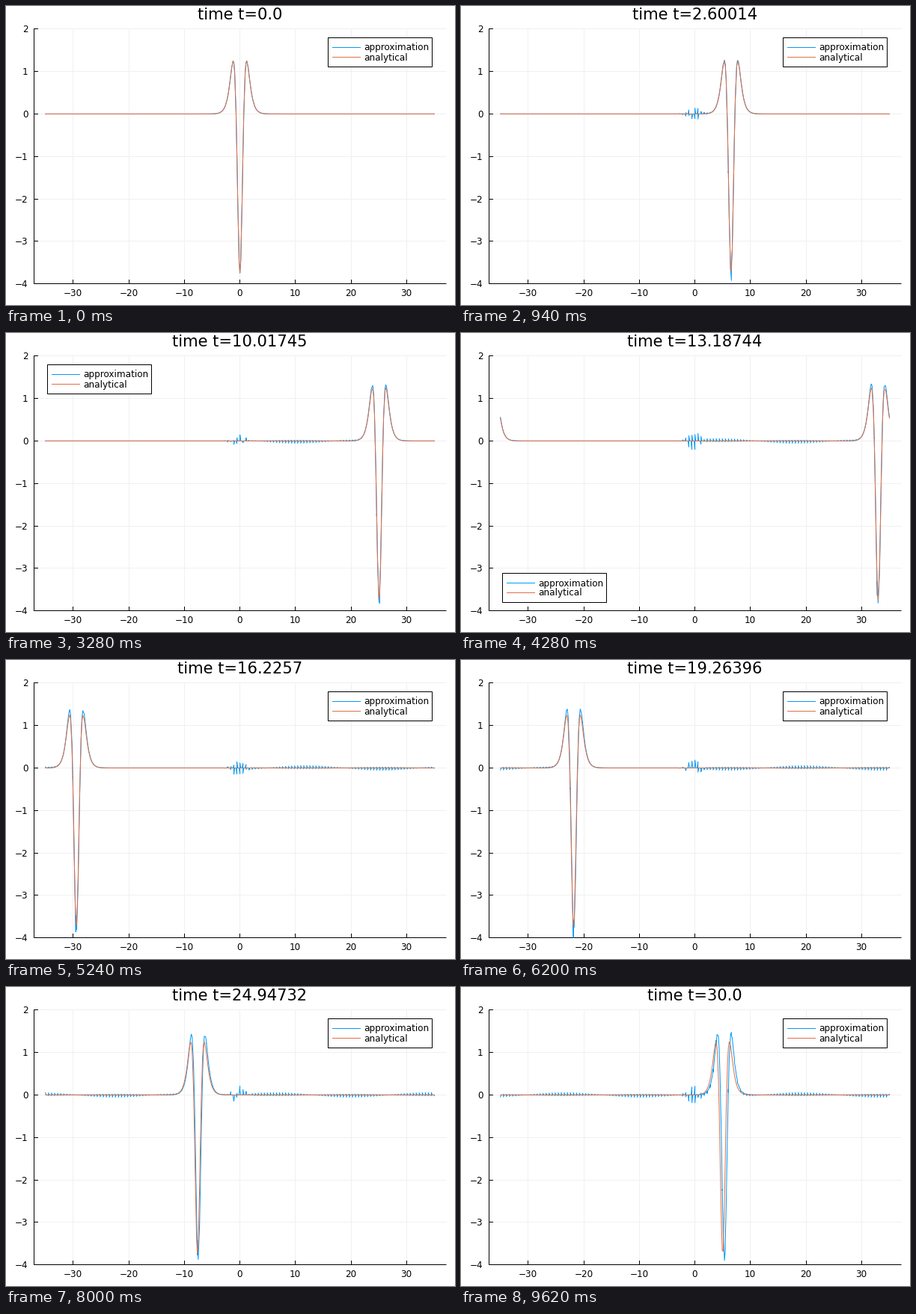
Recreate the animation shown at these times as a matplotlib script. Size 600 px wide and 400 px high, loop 9640 ms.

```python
import numpy as np
import matplotlib as mpl
import matplotlib.pyplot as plt
from matplotlib.animation import FuncAnimation
from matplotlib.patches import Rectangle

W, H, DPI = 600, 400, 100
FRAMES, STEP = 482, 20
BLUE, ORANGE = "#009afa", "#e36f47"
PT = 72 / DPI  # points per pixel

mpl.rcParams["font.family"] = "DejaVu Sans"
mpl.rcParams["path.simplify"] = False

# Periodic domain split into elements of four Lobatto nodes
HALF, CELLS, SPEED = 35.0, 128, 2.5
CELL = 2 * HALF / CELLS
edges = -HALF + CELL * np.arange(CELLS)
lobatto = np.array([0, (1 - 5 ** -0.5) / 2, (1 + 5 ** -0.5) / 2, 1])
nodes = edges[:, None] + CELL * lobatto

# Times reached by the adaptive stepper after its start-up
KEY = [47, 113, 214, 310, 400, 480, 481]
KEY_T = [2.60014, 6.78406, 13.18744, 19.26396, 24.94732, 29.9966, 30.0]

# Ripples that stay near x = 0, each cell edge with its own rhythm
rng = np.random.default_rng(4)
rate = rng.uniform(1.5, 3, (2, CELLS))
phase = rng.uniform(0, 2 * np.pi, (2, CELLS))
reach = 0.22 * np.exp(-((edges + 0.3) / 1.3) ** 2)


def px(x):
    return 312.6 + 7.426 * np.asarray(x)


def py(y):
    return 144.4 - 56.83 * np.asarray(y)


def wrap(x):
    return (x + HALF) % (2 * HALF) - HALF


def sim_time(n):
    if n <= KEY[0]:
        ramp = lambda k: k - 6 * (1 - np.exp(-k / 6))
        return KEY_T[0] * ramp(n) / ramp(KEY[0])
    return float(np.interp(n, KEY, KEY_T))


def profile(xi):
    return 3.75 * (np.cosh(3 * np.sqrt(0.4) * xi) - 2) / np.cosh(3 * xi / np.sqrt(10)) ** 4


def analytical(t):
    return profile(wrap(nodes - SPEED * t))


def approximation(t):
    tau, start = t / 30, min(t, 1)
    center = SPEED * t + 0.3 * tau ** 5
    u = profile(wrap(nodes - center))
    u = u * np.where(u > 0, 1 + 0.14 * tau * u, 1 + 0.04 * tau)

    # Oscillating jumps left behind by the wave
    d = center - edges % (2 * HALF)
    fade = np.clip((d - 2) / 5, 0, 1)
    trail = -0.055 * fade * np.cos(2 * np.pi * (d - 15) / 27.5)
    right, left = start * reach * np.sin(rate * t + phase)

    # Jump across the trough
    dip = 0.22 * start * np.exp(-(wrap(edges - center) / 0.3) ** 2)
    u[:, 0] += trail + right + dip
    u[:, 3] += np.roll(left - 0.35 * trail - dip, -1)
    return u


def legend_corner(series):
    """Emptiest corner; ties go to the first in the list."""
    x = np.concatenate([nodes.ravel()] * len(series))
    y = np.concatenate([s.ravel() for s in series])
    east, west = x >= 18.55, x <= -18.55
    top, low = y >= 0.5, y <= -2.5
    corners = [(430.5, 42.5, east & top), (55.5, 42.5, west & top),
               (430.5, 321.5, east & low), (55.5, 321.5, west & low)]
    best = min(corners, key=lambda c: c[2].sum())
    return best[:2]


fig = plt.figure(figsize=(W / DPI, H / DPI), dpi=DPI, facecolor="white")
ax = fig.add_axes([0, 0, 1, 1])
ax.set(xlim=(0, W), ylim=(H, 0))
ax.axis("off")


def stroke(x, y, color="black", z=2):
    return ax.plot(x, y, color=color, lw=PT, zorder=z, snap=False)[0]


def label(x, y, s, size=12, ha="center", z=2):
    return ax.text(x, y, s, fontsize=size * PT, ha=ha, va="baseline", zorder=z)


LEFT, RIGHT, TOP, BOTTOM = 37.5, 588, 30.5, 371.5
for v in range(-30, 31, 10):
    x = np.floor(px(v)) + 0.5
    stroke([x, x], [TOP, BOTTOM], "#f0f0f0", 1)
    stroke([x, x], [BOTTOM, BOTTOM - 5])
    label(x - 0.4, 387.5, str(v).replace("-", "\u2212"))
for v in range(-4, 3):
    y = np.floor(py(v)) + 0.5
    stroke([LEFT, RIGHT], [y, y], "#f0f0f0", 1)
    stroke([LEFT, LEFT + 5], [y, y])
    label(29.3, y + 4.3, str(v).replace("-", "\u2212"), ha="right")
stroke([LEFT, LEFT], [TOP, BOTTOM])
stroke([LEFT, RIGHT], [BOTTOM, BOTTOM])

title = label(312.4, 18, "", 21)
window = Rectangle((LEFT, TOP), RIGHT - LEFT, BOTTOM - TOP, transform=ax.transData)
curves = [stroke([], [], c, 3) for c in (BLUE, ORANGE)]
for c in curves:
    c.set_clip_path(window)
    c.set_solid_joinstyle("round")

box = ax.add_patch(Rectangle((0, 0), 139, 39, fc="white", ec="black", lw=PT,
                             zorder=4, snap=False))
keys = [stroke([], [], c, 5) for c in (BLUE, ORANGE)]
names = [label(0, 0, s, ha="left", z=5) for s in ("approximation", "analytical")]


def draw(n):
    t = sim_time(n)
    title.set_text(f"time t={round(float(t), 5)}")
    series = [approximation(t), analytical(t)]
    for curve, u in zip(curves, series):
        curve.set_data(px(nodes.ravel()), py(u.ravel()))
    x, y = legend_corner(series)
    box.set_xy((x, y))
    for i, (key, name) in enumerate(zip(keys, names)):
        row = y + 13 * (i + 1)
        key.set_data([x + 6, x + 43], [row, row])
        name.set_position((x + 47.7, row + 4))
    return [title, *curves, box, *keys, *names]


anim = FuncAnimation(fig, draw, frames=FRAMES, interval=STEP, repeat=True,
                     repeat_delay=0, blit=False)
plt.show()
```
